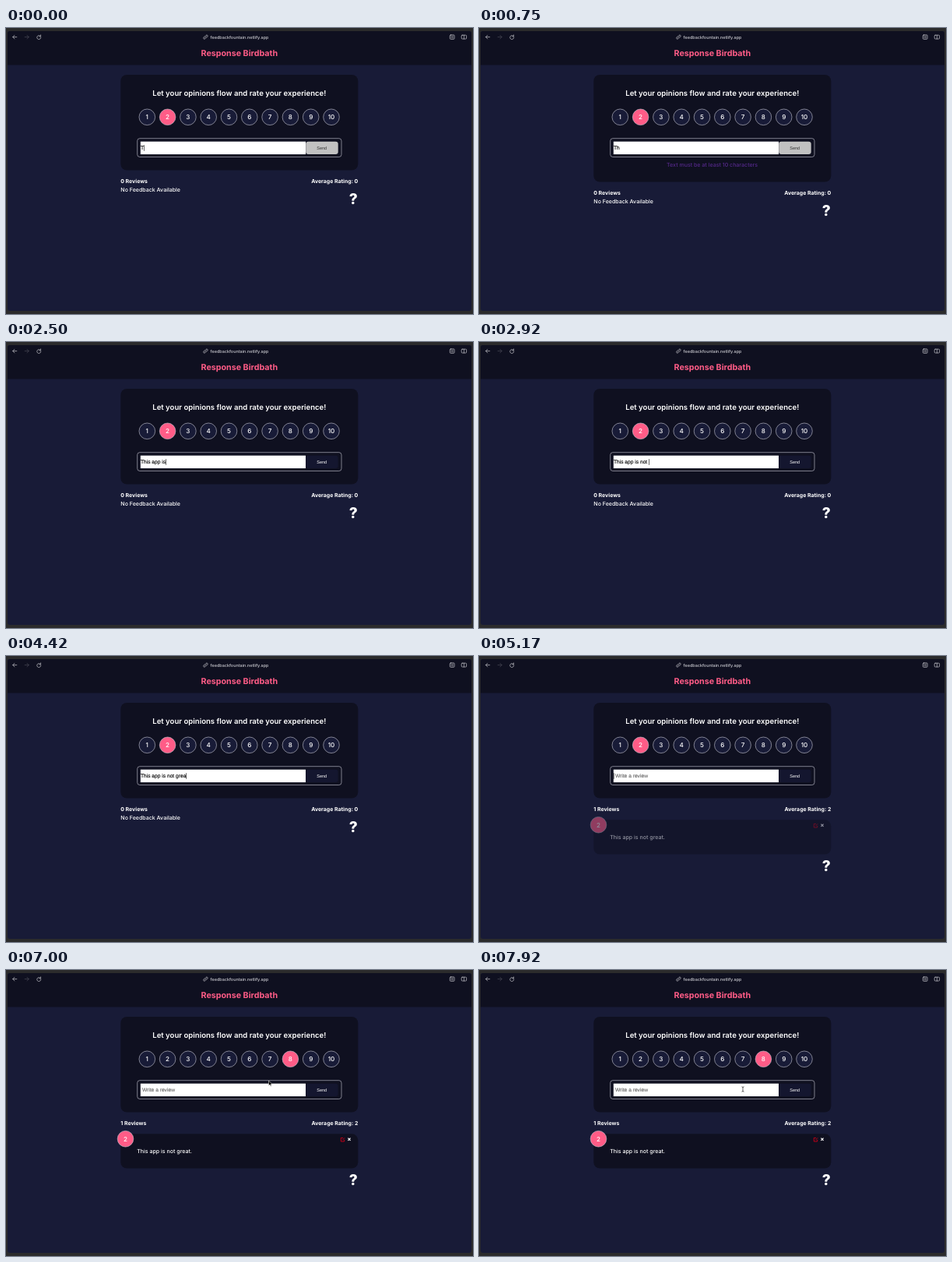
An HTML page for the animation above (8000 ms loop, 600 by 367 pixels).

```html
<!DOCTYPE html>
<html lang="en">
<head>
<meta charset="utf-8">
<title>Review form</title>
<style>
  html, body { margin: 0; width: 100%; height: 100%; overflow: hidden; background: #2b2b2c; }
  svg { display: block; width: 600px; height: 367px; }
  text { font-family: Inter, sans-serif; font-size: 7.05px; font-weight: 500; fill: #fff; text-rendering: geometricPrecision; }
  .bold { font-weight: 700; font-size: 6.95px; }
  .mid { text-anchor: middle; }
  .end { text-anchor: end; }
  .num { font-size: 8.1px; text-anchor: middle; }
  .field, .button { font-family: "Liberation Sans", Arial, sans-serif; font-weight: 400; }
  .field { font-size: 6.667px; fill: #000; stroke: #000; stroke-width: .12; white-space: pre; }
  .button { font-size: 5.556px; text-anchor: middle; }
  .panel { fill: #0f1020; }
  .ring { stroke: #c9cad6; stroke-width: .6; }
  .icon { fill: none; stroke: #c4c4ca; stroke-width: .7; stroke-linecap: round; stroke-linejoin: round; }
</style>
</head>
<body>
<svg viewBox="0 0 600 367">
  <rect width="600" height="367" fill="#2b2b2c"/>
  <rect x="2" y="4" width="596" height="359" rx="3" fill="#181b37"/>
  <path class="panel" d="M2 47.5V7a3 3 0 0 1 3-3H595a3 3 0 0 1 3 3V47.5Z"/>

  <!-- browser bar -->
  <g class="icon">
    <path d="M13.8 11.6H8.8M11 9.3L8.7 11.6L11 13.9"/>
    <path d="M24.2 11.6H29.2M27 9.3L29.3 11.6L27 13.9" stroke="#4a4a56"/>
    <path d="M44.3 10.6A2.5 2.5 0 1 0 44.8 12M44.6 8.9V10.8H42.7"/>
    <path d="M255.6 12.4L257.3 10.7M255.8 10.6L257 9.4A1.2 1.2 0 0 1 258.8 11.2L257.6 12.4M256.9 12.7L255.8 13.8A1.2 1.2 0 0 1 254 12L255.1 10.9"/>
    <rect x="570.3" y="8.8" width="5.8" height="5.6" rx="1.2"/>
    <path d="M571.8 10.6H574.6M571.8 12.6H574.6"/>
    <rect x="585.2" y="9.2" width="6.4" height="4.8" rx="1"/>
    <path d="M588.4 9.2V14"/>
  </g>
  <text class="mid" x="300" y="13.5" style="font-size:5.45px;fill:#c9c9cf">feedbackfountain.netlify.app</text>
  <text class="mid" x="299.8" y="36.2" style="font-size:10.7px;font-weight:700;fill:#ff5c87">Response Birdbath</text>

  <!-- form -->
  <rect id="card" class="panel" x="147.3" y="60" width="305" rx="8"/>
  <text class="mid" x="299.8" y="87" style="font-size:9.58px;font-weight:600">Let your opinions flow and rate your experience!</text>
  <g id="ratings"></g>
  <rect class="ring" x="168.7" y="141.7" width="262.3" height="23.8" rx="3.2" fill="none"/>
  <rect x="172.8" y="145.7" width="212.2" height="16.4" fill="#fff"/>
  <text id="typed" class="field" x="172.9" y="156.1"></text>
  <text id="placeholder" class="field" x="174.9" y="156.1" style="fill:#666;stroke:#666">Write a review</text>
  <rect id="caret" y="150.2" width=".6" height="7.6"/>
  <rect id="send" x="385.2" y="145.7" width="41.5" height="16.4" rx="3.3"/>
  <text id="sendLabel" class="button" x="405.7" y="155.7">Send</text>
  <text id="error" class="mid" x="299.6" y="178" style="fill:#55288a">Text must be at least 10 characters</text>

  <!-- reviews -->
  <g id="below">
    <text id="count" class="bold" x="147.3" y="198.8"></text>
    <text id="average" class="bold end" x="452.3" y="198.8"></text>
    <text id="none" x="147.3" y="210">No Feedback Available</text>
    <g id="review">
      <rect class="panel" x="147.3" y="210.3" width="305" height="44.2" rx="8"/>
      <circle class="ring" cx="153.5" cy="216.7" r="10.3" fill="#ff5c87"/>
      <text class="num" x="153.5" y="219.7">2</text>
      <text x="168.2" y="235">This app is not great.</text>
      <path d="M433 215.4H430.3V220H434.6V217.8M432.2 218.3L435 215.4" fill="none" stroke="#c40018" stroke-width=".95"/>
      <path d="M439.4 215.7L442.6 218.9M442.6 215.7L439.4 218.9" stroke="#fff" stroke-width="1.2"/>
    </g>
    <text id="help" class="mid" x="446.2" style="font-size:19px;font-weight:800">?</text>
  </g>

  <g id="pointer">
    <path id="arrow" d="M0 0V6.4L1.5 5L2.5 7.2L3.5 6.7L2.6 4.6H4.6Z" fill="#000" stroke="#fff" stroke-width=".5"/>
    <path id="beam" d="M-1.5 -3.2Q0 -3.2 0 -2.2Q0 -3.2 1.5 -3.2M0 -2.4V2.4M-1.5 3.2Q0 3.2 0 2.2Q0 3.2 1.5 3.2" fill="none" stroke="#222" stroke-width=".7"/>
  </g>
</svg>
<script>
const LOOP = 8000, SUBMIT = 5000, ENTER = 5670, CLICK = 6540, REFOCUS = 7420;
const BLINK = 500, FADE = 240;
const sentence = 'This app is not great.';
const $ = id => document.getElementById(id);
const show = (id, on) => $(id).setAttribute('visibility', on ? 'visible' : 'hidden');
const clamp = v => Math.min(1, Math.max(0, v));
const ratingX = n => 181.3 + 26.3 * (n - 1);

// The first letter is there at once; the rest comes in three evenly paced bursts.
const burst = (start, count, gap) => Array.from({ length: count }, (_, i) => start + i * gap);
const keystrokes = [0, ...burst(250, 3, 540), ...burst(1830, 14, 98), ...burst(3920, 4, 300)];

const moves = [
  { start: ENTER, end: 5860, x: 314, y: 118 },
  { start: 5860, end: 6000, x: 335, y: 127 },
  { start: 6000, end: 6420, x: 364, y: 115 },
  { start: 6580, end: 6800, x: 337.5, y: 142 },
  { start: 7000, end: REFOCUS, x: 339, y: 153 }
];

function pointerAt(t) {
  let x = 296, y = 150;
  for (const move of moves) {
    const p = clamp((t - move.start) / (move.end - move.start));
    x += (move.x - x) * p;
    y += (move.y - y) * p;
  }
  return { x, y };
}

function isPink(n, t) {
  if (n === (t < CLICK ? 2 : 8)) return true;
  const { x, y } = pointerAt(t);
  return t > ENTER && Math.hypot(x - ratingX(n), y - 114.3) < 10.4;
}

// A fading colour is the average of the recent on/off states.
function pinkShare(n, t) {
  const samples = 12;
  let on = 0;
  for (let i = 0; i < samples; i++) on += isPink(n, t - FADE * i / samples);
  return on / samples;
}

function mixPink(share) {
  const from = [24, 27, 55], to = [255, 92, 135];
  return `rgb(${from.map((c, i) => Math.round(c + (to[i] - c) * share))})`;
}

for (let n = 1; n <= 10; n++) {
  $('ratings').insertAdjacentHTML('beforeend',
    `<circle id="rate${n}" class="ring" cx="${ratingX(n)}" cy="114.3" r="10.3"/>
     <text class="num" x="${ratingX(n)}" y="117.2">${n}</text>`);
}

function drawForm(t) {
  const submitted = t >= SUBMIT;
  const pressed = keystrokes.filter(time => time <= t);
  const length = submitted ? 0 : pressed.length;
  // Validation lags one letter behind the field.
  const enabled = sentence.slice(0, pressed.length - 1).trim().length >= 10;
  const error = pressed.length > 1 && !enabled;

  $('typed').textContent = sentence.slice(0, length);
  show('placeholder', length === 0);
  const focused = t < CLICK || t >= REFOCUS;
  const lastInput = t >= REFOCUS ? REFOCUS : submitted ? SUBMIT + 170 : pressed.at(-1);
  $('caret').setAttribute('x', 172.9 + (length ? $('typed').getComputedTextLength() : 0));
  show('caret', focused && (t < lastInput || Math.floor((t - lastInput) / BLINK) % 2 === 0));

  show('error', error);
  $('card').setAttribute('height', error ? 137.5 : 122.5);
  $('below').setAttribute('transform', `translate(0 ${error ? 15 : 0})`);
  $('send').setAttribute('fill', enabled ? '#14162f' : '#c1c1c1');
  $('sendLabel').style.fill = enabled ? '#fff' : '#333';

  $('count').textContent = `${submitted ? 1 : 0} Reviews`;
  $('average').textContent = `Average Rating: ${submitted ? 2 : 0}`;
  show('none', !submitted);
  $('review').setAttribute('opacity', clamp((t - SUBMIT) / 330));
  $('help').setAttribute('y', submitted ? 276 : 225.6);
}

function drawPointer(t) {
  const { x, y } = pointerAt(t);
  const visible = t >= ENTER, overField = y > 145.7;
  $('pointer').setAttribute('transform', `translate(${x} ${y})`);
  show('arrow', visible && !overField);
  show('beam', visible && overField);
}

function frame() {
  const t = performance.now() % LOOP;
  for (let n = 1; n <= 10; n++) $('rate' + n).setAttribute('fill', mixPink(pinkShare(n, t)));
  drawForm(t);
  drawPointer(t);
  requestAnimationFrame(frame);
}
frame();
</script>
</body>
</html>
```
